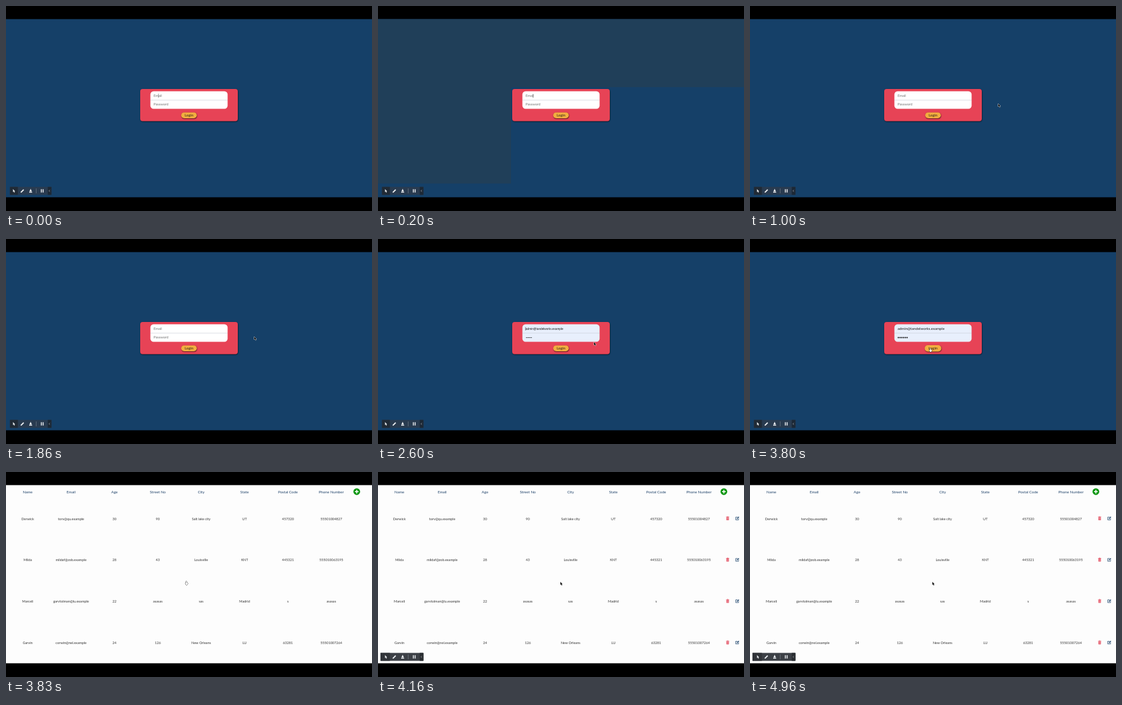
These frames come from a looping animation (600x336 px, 5 s). An HTML page with a canvas:

```html
<!DOCTYPE html>
<html lang="en">
<head>
<meta charset="utf-8">
<title>Login and contact table</title>
<style>
html, body { margin: 0; width: 100%; height: 100%; overflow: hidden; background: #000; }
canvas { display: block; width: 600px; height: 336px; }
</style>
</head>
<body>
<canvas id="stage"></canvas>
<script>
const LOOP = 5000;
const PREVIEW_AT = 2480, FILLED_AT = 2920, HOVER_AT = 3480;
const TABLE_AT = 3830, ICONS_AT = 3890, BAR_AT = 3950;
const FONT = 'Lato, "Open Sans", sans-serif';
const PREVIEW_FONT = '"Liberation Sans", Arial, sans-serif';
const TOP = 21.5, BOTTOM = 313.5;

const canvas = document.getElementById('stage');
const ctx = canvas.getContext('2d');
const dpr = window.devicePixelRatio || 1;
canvas.width = 600 * dpr;
canvas.height = 336 * dpr;
ctx.scale(dpr, dpr);

const heads = ['Name', 'Email', 'Age', 'Street No', 'City', 'State', 'Postal Code', 'Phone Number'];
const rows = [
  'Derwick|torv@qu.example|30|90|Salt lake city|UT|457320|55501004827',
  'Milda|mildaf@zob.example|28|43|Louisville|KNT|445321|555010063195',
  'Marceli|garvtolman@lu.example|22|asasas|sas|Madrid|s|asasas',
  'Garvin|corwin@nel.example|24|126|New Orleans|LU|63281|55501007264'
].map(row => row.split('|'));
const account = 'admin@tandelworks.example';

const moves = [
  { from: 120, to: 950, x: 408, y: 163 },
  { from: 1950, to: 2200, x: 345, y: 149 },
  { from: 2300, to: PREVIEW_AT, x: 355, y: 172 },
  { from: 2900, to: HOVER_AT, x: 296, y: 182 },
  { from: ICONS_AT, to: 4000, x: 300, y: 183 }
];

const clamp = u => Math.min(1, Math.max(0, u));
const ease = u => u * u * (3 - 2 * u);

function pointerAt(t) {
  let x = 250, y = 147;
  for (const m of moves) {
    const u = ease(clamp((t - m.from) / (m.to - m.from)));
    x += (m.x - x) * u;
    y += (m.y - y) * u;
  }
  return [x, y];
}

function rect(x, y, w, h, color) {
  ctx.fillStyle = color;
  ctx.fillRect(x, y, w, h);
}

function round(x, y, w, h, r, color) {
  ctx.fillStyle = color;
  ctx.beginPath();
  ctx.roundRect(x, y, w, h, r);
  ctx.fill();
}

function raised(x, y, w, h, r, color) {
  ctx.save();
  ctx.shadowColor = 'rgba(0,0,0,.75)';
  ctx.shadowBlur = 1.6 * dpr;
  ctx.shadowOffsetX = 0.4 * dpr;
  ctx.shadowOffsetY = 0.8 * dpr;
  round(x, y, w, h, r, color);
  ctx.restore();
}

function disc(x, y, r, color) {
  ctx.fillStyle = color;
  ctx.beginPath();
  ctx.arc(x, y, r, 0, Math.PI * 2);
  ctx.fill();
}

function line(x0, y0, x1, y1, color, width = 0.6) {
  ctx.strokeStyle = color;
  ctx.lineWidth = width;
  ctx.beginPath();
  ctx.moveTo(x0, y0);
  ctx.lineTo(x1, y1);
  ctx.stroke();
}

function text(str, x, y, size, color, align = 'center', font = FONT) {
  ctx.font = `${size}px ${font}`;
  ctx.fillStyle = color;
  ctx.textAlign = align;
  ctx.fillText(str, x, y);
}

function shape(x, y, d, fill, edge) {
  const path = new Path2D(d);
  ctx.save();
  ctx.translate(x, y);
  if (edge) {
    ctx.strokeStyle = edge;
    ctx.lineWidth = 0.9;
    ctx.stroke(path);
  }
  ctx.fillStyle = fill;
  ctx.fill(path);
  ctx.restore();
}

const arrow = (x, y, fill, edge) => shape(x, y, 'M-1-3V2L0 1 1 3 2 2.5 1 1H2.5Z', fill, edge);
const hand = (x, y) => shape(x, y, 'M-1-3H0V-1L2 0V1L1 3H-1L-2 0H-1Z', '#fff', '#222');

function beam(x, y) {
  line(x, y - 2.5, x, y + 2.5, '#666');
  for (const end of [-2.7, 2.7]) line(x - 1, y + end, x + 1, y + end, '#888', 0.5);
}

function pointer(t) {
  const [x, y] = pointerAt(t);
  const inField = x > 237 && x < 363 && y < 168;
  if (t >= HOVER_AT - 60 && t < ICONS_AT) hand(x, y);
  else if (t < TABLE_AT && inField) beam(x, y);
  else arrow(x, y, '#111', '#eee');
}

function toolbar(onTable) {
  const left = onTable ? 4 : 6.5, ink = '#eef1f4';
  const [bar, active, tab] = onTable
    ? ['#3c4046', '#303338', '#292c30']
    : ['#293b50', '#202a35', '#1c2835'];
  round(left, 296.5, 74.5 - left, 13, 1, bar);
  rect(left, 296.5, 19.5 - left, 13, active);
  rect(68.5, 296.5, 6, 13, tab);
  arrow(12.5, 303, ink);
  line(24.3, 305.7, 29, 301, ink, 1.8);
  shape(40.4, 303, 'M0-3.5L2 1H-2Z', ink);
  rect(38, 304.6, 4.8, 1.4, ink);
  line(49.5, 299, 49.5, 307, '#7c8792');
  for (const x of [57.2, 60.1]) rect(x, 300.3, 1.5, 5.4, ink);
  for (const dy of [-1.5, 1.5]) line(71.8, 303 + dy, 70.5, 303, '#d0d5da');
}

function fields(t) {
  const preview = t >= PREVIEW_AT, filled = t >= FILLED_AT;
  round(236.7, 139.8, 126.6, 28.6, 5.2, preview ? '#e8effc' : '#fff');
  line(237, 154.2, 363, 154.2, '#c4c9d2');
  if (!preview) {
    text('Email', 242, 149.1, 5.8, '#757575', 'left');
    text('Password', 242, 163.3, 5.8, '#757575', 'left');
  } else {
    text(account, 242, 149.1, filled ? 6 : 4.7, '#1a1a1a', 'left', filled ? FONT : PREVIEW_FONT);
    const r = filled ? 1.1 : 0.65;
    for (let i = 0; i < account.indexOf('@') + 1; i++) disc(243.2 + i * r * 2.6, 161.6, r, '#111');
  }
  if (t > 2300 && !filled) line(242, 144.5, 242, 150, '#222');
}

function login(t) {
  rect(0, TOP, 600, BOTTOM - TOP, '#154068');
  if (t >= 60 && t < 360) {
    rect(0, TOP, 600, 133 - TOP, '#203f59');
    rect(0, 133, 218, 158, '#203f59');
  }
  raised(220, 136, 160, 52.7, 4, '#e74356');
  fields(t);
  const grow = t >= HOVER_AT ? 0.8 : 0;
  raised(287.2 - grow, 174.4 - grow / 2, 25.6 + grow * 2, 9.6 + grow, 5, '#f2ad3f');
  text('Login', 300, 181.3, 6 + grow / 2, '#2b2118');
  toolbar(false);
}

function trash(x, y) {
  const red = '#e4596a';
  rect(x - 2.6, y - 2.6, 5.2, 0.8, red);
  rect(x - 1, y - 3.2, 2, 0.7, red);
  round(x - 2.1, y - 1.6, 4.2, 4.7, 0.6, red);
  for (let dx = -1; dx <= 1; dx++) line(x + dx, y - 0.8, x + dx, y + 2.3, '#f7c4ca', 0.4);
}

function edit(x, y) {
  ctx.strokeStyle = '#244a70';
  ctx.lineWidth = 0.8;
  ctx.strokeRect(x - 2.4, y - 1.9, 4.4, 4.4);
  line(x - 0.6, y + 0.9, x + 2.6, y - 2.3, '#fdfdfd', 2.4);
  line(x - 0.6, y + 0.9, x + 2.6, y - 2.3, '#244a70', 1.4);
}

function table(t) {
  const ready = t >= ICONS_AT;
  const gap = ready ? 70.15 : 71.1, first = gap / 2;
  const plusX = ready ? 567 : 575;
  rect(0, TOP, 600, BOTTOM - TOP, '#fdfdfd');
  heads.forEach((head, i) => text(head, first + gap * i, 34.6, 6.2, '#1d4068'));
  rows.forEach((row, r) => {
    const y = 76.6 + 67.8 * r;
    row.forEach((cell, i) => text(cell, first + gap * i, y + 2, 5.6, '#333'));
    if (ready) {
      trash(573.2, y - 0.7);
      edit(589, y - 0.7);
    }
  });
  disc(plusX, 32.2, 5.5, '#0a970f');
  line(plusX - 3, 32.2, plusX + 3, 32.2, '#fff', 1.6);
  line(plusX, 29.2, plusX, 35.2, '#fff', 1.6);
  ctx.globalAlpha = clamp((t - BAR_AT) / 200);
  toolbar(true);
  ctx.globalAlpha = 1;
}

function frame() {
  const t = performance.now() % LOOP;
  rect(0, 0, 600, 336, '#000');
  if (t < TABLE_AT) login(t);
  else table(t);
  pointer(t);
  requestAnimationFrame(frame);
}
frame();
</script>
</body>
</html>
```
